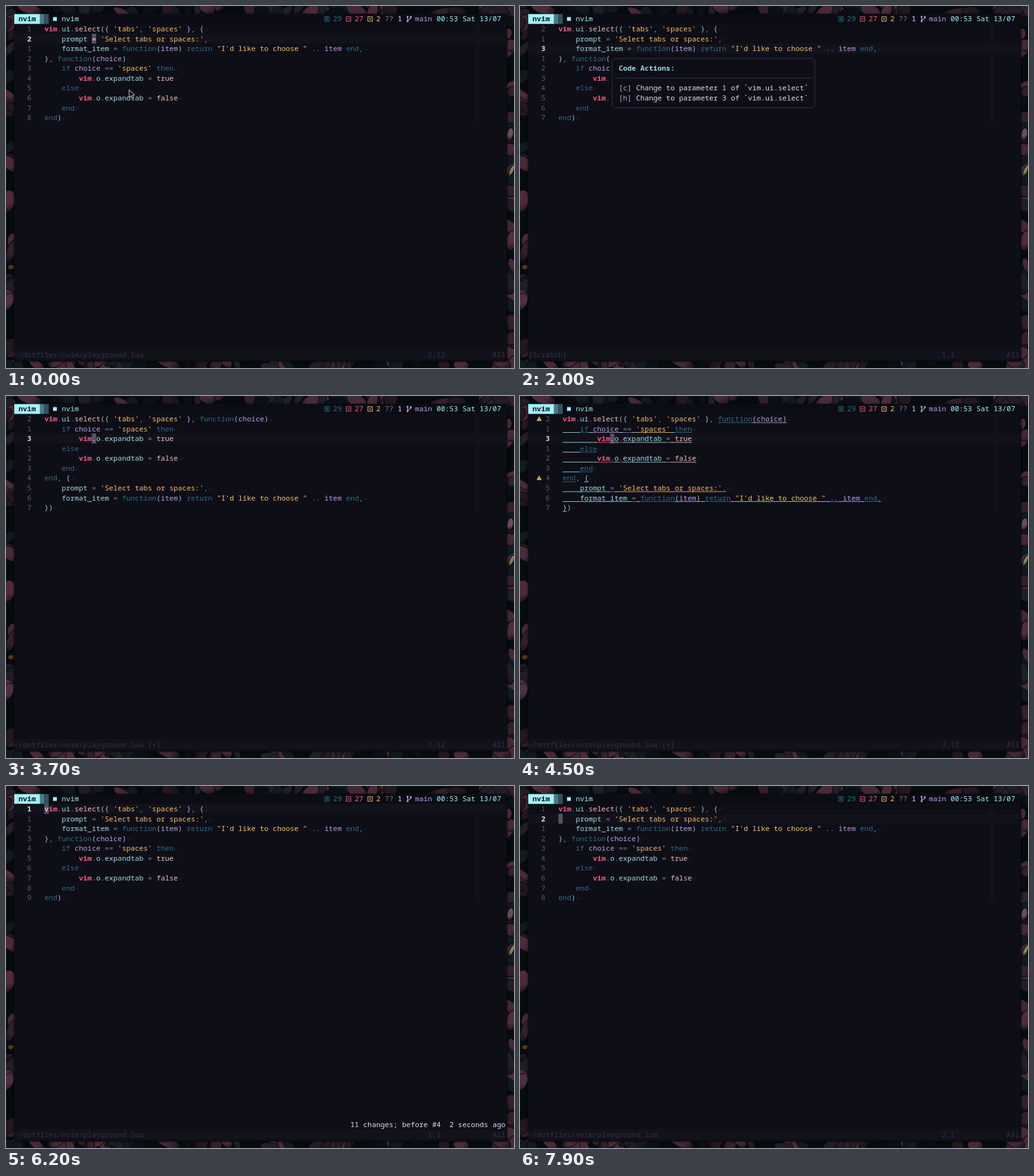
These frames come from a looping animation (800x571 px, 8 s). An HTML page with a canvas:

```html
<!DOCTYPE html>
<html lang="en">
<head>
<meta charset="utf-8">
<title>Code actions in a terminal editor</title>
<style>
html, body { margin: 0; width: 100%; height: 100%; overflow: hidden; background: #060b0e; }
canvas { display: block; }
</style>
</head>
<body>
<canvas id="stage" width="800" height="571"></canvas>
<script>
const LOOP = 8000, LEFT = 13, TOP = 12.7, CW = 6.785, LH = 15.56, COLS = 114;
const FONT = '11.31px "Noto Sans Mono", "DejaVu Sans Mono", monospace';
const C = {
  text: '#e0def4', subtle: '#817d9b', bracket: '#a5bcc8', foam: '#9cdbe2', pine: '#2d6c86',
  love: '#f0587f', gold: '#f8bf68', iris: '#bb9eea', rose: '#efbfbb', number: '#5d5a70',
  faint: '#343247', eol: '#1f1e2a', bar: '#9df4fb', base: '#0e0e17', line: '#12121b'
};

const BEFORE = [
  "vim.ui.select({ 'tabs', 'spaces' }, {",
  "    prompt = 'Select tabs or spaces:',",
  "    format_item = function(item) return \"I'd like to choose \" .. item end,",
  "}, function(choice)",
  "    if choice == 'spaces' then",
  "        vim.o.expandtab = true",
  "    else",
  "        vim.o.expandtab = false",
  "    end",
  "end)"
];
const AFTER = [
  BEFORE[0].slice(0, -1) + 'function(choice)',
  ...BEFORE.slice(4, 9),
  'end, {',
  ...BEFORE.slice(1, 3),
  '})'
];

const PATH = '~/dotfiles/nvim/playground.lua';
const UNDO = '11 changes; before #4  2 seconds ago';
const SCENES = [
  { at: 0, code: BEFORE, row: 1, col: 11, mouse: true },
  { at: 700, code: BEFORE, row: 2, col: 11 },
  { at: 1100, code: BEFORE, row: 2, col: 11, keys: '<20>' },
  { at: 1500, code: BEFORE, row: 2, col: 11, popup: true },
  { at: 3600, code: AFTER, row: 2, col: 11, dirty: true },
  { at: 3800, code: AFTER, row: 2, col: 11, dirty: true, warn: true },
  { at: 5600, code: BEFORE, row: 0, col: 0, warn: true, stale: true, message: UNDO },
  { at: 6000, code: BEFORE, row: 0, col: 0, message: UNDO },
  { at: 7100, code: BEFORE, row: 1, col: 0 }
];

const stage = document.getElementById('stage');
let g = stage.getContext('2d');
const px = col => LEFT + col * CW;
const py = row => TOP + row * LH;
const mid = row => py(row) + LH / 2;

function fill(col, row, w, h, color) {
  g.fillStyle = color;
  g.fillRect(px(col), py(row), w * CW, h * LH);
}

function put(str, col, row, color, bold) {
  g.font = (bold ? 'bold ' : '') + FONT;
  g.fillStyle = color;
  [...str].forEach((ch, i) => ch !== ' ' && g.fillText(ch, px(col + i), mid(row) + 4));
}

function stroke(points, color, width = 1, closed = false) {
  g.strokeStyle = color;
  g.lineWidth = width;
  g.beginPath();
  points.forEach(([x, y]) => g.lineTo(x, y));
  if (closed) g.closePath();
  g.stroke();
}

function shape(points, color) {
  g.fillStyle = color;
  g.beginPath();
  points.forEach(([x, y]) => g.lineTo(x, y));
  g.closePath();
  g.fill();
}

// Leafy wallpaper visible around the window
function wallpaper() {
  let seed = 11;
  const rnd = () => (seed = seed * 16807 % 2147483647) / 2147483647;
  const leaf = (x, y, rx, ry, turn, color) => {
    g.save();
    g.translate(x, y);
    g.rotate(turn);
    const shade = g.createLinearGradient(-rx, -ry, rx, ry);
    shade.addColorStop(0, color);
    shade.addColorStop(0.6, color);
    shade.addColorStop(1, '#0d0e13');
    g.fillStyle = shade;
    g.beginPath();
    g.ellipse(0, 0, rx, ry, 0, 0, 7);
    g.fill();
    g.strokeStyle = '#070a0d';
    g.stroke();
    g.restore();
  };
  g.fillStyle = '#060b0e';
  g.fillRect(0, 0, 800, 571);
  const tones = ['#33202b', '#432836', '#211f25', '#101b1d', '#4a2a38', '#241820', '#0a1114'];
  for (let i = 0; i < 170; i++) {
    const d = rnd() * 2742, off = rnd() * 12;
    const [x, y] = d < 800 ? [d, off] : d < 1371 ? [800 - off, d - 800]
      : d < 2171 ? [d - 1371, 571 - off] : [off, d - 2171];
    leaf(x, y, 9 + rnd() * 12, 5 + rnd() * 6, rnd() * 3, tones[Math.floor(rnd() * tones.length)]);
  }
  leaf(2, 308, 12, 18, 0.3, '#50293a');
  leaf(2, 467, 9, 15, 0.5, '#4d2e42');
  leaf(8, 412, 5, 4, 0, '#573519');
  leaf(794, 202, 5, 10, 0.2, '#6a4d5b');
  leaf(796, 260, 3, 10, 0.4, '#857e56');
  leaf(796, 370, 8, 16, 0.2, '#522c3b');
  g.shadowColor = '#000';
  g.shadowBlur = 3;
  g.fillStyle = C.base;
  g.fillRect(13, 12.5, 775.5, 548);
  g.shadowBlur = 0;
}

function topBar() {
  fill(0, 0, COLS, 1, '#0c0d14');
  fill(0, 0, 6, 1, C.bar);
  fill(6, 0, 1, 1, '#4d7985');
  fill(7, 0, 1, 1, '#33525e');
  put('nvim', 1, 0, '#10131c', true);
  g.fillStyle = C.bar;
  g.fillRect(px(9), mid(0) - 3, 6, 6);
  put('nvim', 11, 0, C.bar);
  [[72, C.pine, '29'], [77, C.love, '27'], [82, C.gold, '2']].forEach(([col, color, n], i) => {
    const x = px(col) + 0.5, y = mid(0);
    g.strokeStyle = color;
    g.lineWidth = 1;
    g.strokeRect(x, y - 3.5, 7, 7);
    if (i < 2) stroke([[x + 1.5, y], [x + 5.5, y]], color);
    if (i === 0) stroke([[x + 3.5, y - 3], [x + 3.5, y + 3]], color);
    if (i === 2) { g.fillStyle = color; g.fillRect(x + 2.5, y - 1, 2, 2); }
    put(n, col + 2, 0, color);
  });
  put('??', 86, 0, C.subtle);
  put('1', 89, 0, C.text);
  const x = px(91) + 1, y = mid(0);
  stroke([[x + 1, y - 4], [x + 1, y + 4]], C.iris, 1.2);
  stroke([[x + 6, y - 3], [x + 6, y - 1], [x + 1, y + 2]], C.iris, 1.2);
  g.fillStyle = C.iris;
  [[1, -3.5], [6, -3], [1, 3.5]].forEach(([dx, dy]) => g.fillRect(x + dx - 1.3, y + dy - 1.3, 2.6, 2.6));
  put('main', 93, 0, C.iris);
  put('00:53 Sat 13/07', 98, 0, C.bar);
}

function tokenStyle(word, row, stale) {
  if (/^['"]/.test(word)) return [C.gold];
  if (/^(function|return|end|if|then|else)$/.test(word)) return [C.pine];
  if (/^(true|false|select)$/.test(word)) return [C.rose];
  if (stale) {
    if (word === 'format_item') return [C.rose];
    if (word === 'choice') return row === 3 ? [C.love, true] : [C.text];
    if (row === 7 && word === 'vim') return [C.foam];
    if (row === 7 && word === 'expandtab') return [C.iris];
  }
  if (word === 'vim') return [C.love, true];
  if (/^(choice|item)$/.test(word)) return [C.iris];
  if (/^\w/.test(word)) return [C.foam];
  return [/[(){}]/.test(word) ? C.bracket : C.subtle];
}

// Two warnings: from (0,36) to (6,3) and from (6,5) to (9,1)
const warned = (row, col) =>
  row === 0 ? col >= 36 : row === 6 ? col < 3 || col > 4 : row < 9 || col < 1;

function codeLine(str, row, left, s) {
  const words = /'[^']*'|"[^"]*"|\w+|\s+|[^\w\s]/g;
  for (const { 0: word, index } of str.matchAll(words)) {
    const blank = !word.trim();
    const [color, bold] = blank ? [C.foam] : tokenStyle(word, row, s.stale);
    put(word, left + index, row + 1, color, bold);
    if (!s.warn) continue;
    g.fillStyle = color;
    for (let i = index; i < index + word.length; i++)
      if (warned(row, i)) g.fillRect(px(left + i), mid(row + 1) + 5.5, CW, 0.9);
  }
  const x = px(left + str.length), y = mid(row + 1);
  stroke([[x + 5.5, y - 2], [x + 5.5, y + 2], [x + 1.5, y + 2]], C.eol);
  shape([[x + 0.8, y + 2], [x + 3, y], [x + 3, y + 4]], C.eol);
}

function warningSign(row) {
  const x = px(2), y = mid(row + 1);
  shape([[x + 3.6, y - 4], [x + 7.6, y + 3.2], [x - 0.4, y + 3.2]], C.gold);
  g.fillStyle = C.base;
  g.fillRect(x + 3.2, y - 1, 0.8, 2);
  g.fillRect(x + 3.2, y + 1.7, 0.8, 0.8);
}

function editor(s) {
  const left = s.warn ? 8 : 7;
  fill(left + 100, 1, 1, 10, '#12121b');
  fill(0, s.row + 1, COLS, 1, C.line);
  if (!s.popup) fill(left + s.col, s.row + 1, 1, 1, '#565068');
  s.code.forEach((str, row) => {
    const here = row === s.row;
    put(String(here ? row + 1 : Math.abs(row - s.row)), left - 4, row + 1, here ? C.text : C.number, here);
    codeLine(str, row, left, s);
  });
  if (!s.popup) put(s.code[s.row][s.col], left + s.col, s.row + 1, C.text);
  if (s.warn) [0, 6].forEach(warningSign);
}

function popup() {
  const x = px(19.5), y = mid(4), w = 47 * CW, h = 5 * LH;
  // The panel covers whole cells, the frame runs through their centres
  fill(19, 4, 48, 6, C.base);
  g.beginPath();
  g.roundRect(x, y, w, h, 4);
  g.strokeStyle = '#343340';
  g.lineWidth = 1;
  g.stroke();
  stroke([[px(20), mid(6)], [px(66), mid(6)]], '#343340');
  put('Code Actions:', 21, 5, C.foam, true);
  [['c', 1], ['h', 3]].forEach(([key, n], i) => {
    put(`[${key}]`, 21, 7 + i, C.iris);
    put(`Change to parameter ${n} of \`vim.ui.select\``, 25, 7 + i, C.text);
  });
}

function statusLine(s) {
  fill(0, 34, COLS, 1, '#12121b');
  put(s.popup ? '[Scratch]' : PATH + (s.dirty ? ' [+]' : ''), 0, 34, C.faint);
  if (s.keys) put(s.keys, 85, 34, C.faint);
  put(s.popup ? '1,1' : `${s.row + 1},${s.col + 1}`, 96, 34, C.faint);
  put('All', 111, 34, C.faint);
  if (s.message) put(s.message, 78, 33, C.text);
}

function pointer(x, y) {
  const arrow = [[0, 0], [0, 12], [2.8, 9.6], [5, 14.5], [7, 13.6], [4.9, 8.8], [8.5, 8.5]]
    .map(([dx, dy]) => [x + dx, y + dy]);
  shape(arrow, '#08080c');
  stroke(arrow, '#d8d8dc', 1, true);
}

const backdrop = document.createElement('canvas');
backdrop.width = 800;
backdrop.height = 571;
const screen = g;
g = backdrop.getContext('2d');
wallpaper();
topBar();
g = screen;

function draw(now) {
  const t = now % LOOP;
  const s = SCENES.findLast(scene => scene.at <= t) || SCENES[0];
  g.drawImage(backdrop, 0, 0);
  editor(s);
  if (s.popup) popup();
  statusLine(s);
  if (s.mouse) pointer(194, 132);
  requestAnimationFrame(() => draw(performance.now()));
}
draw(0);
</script>
</body>
</html>
```
